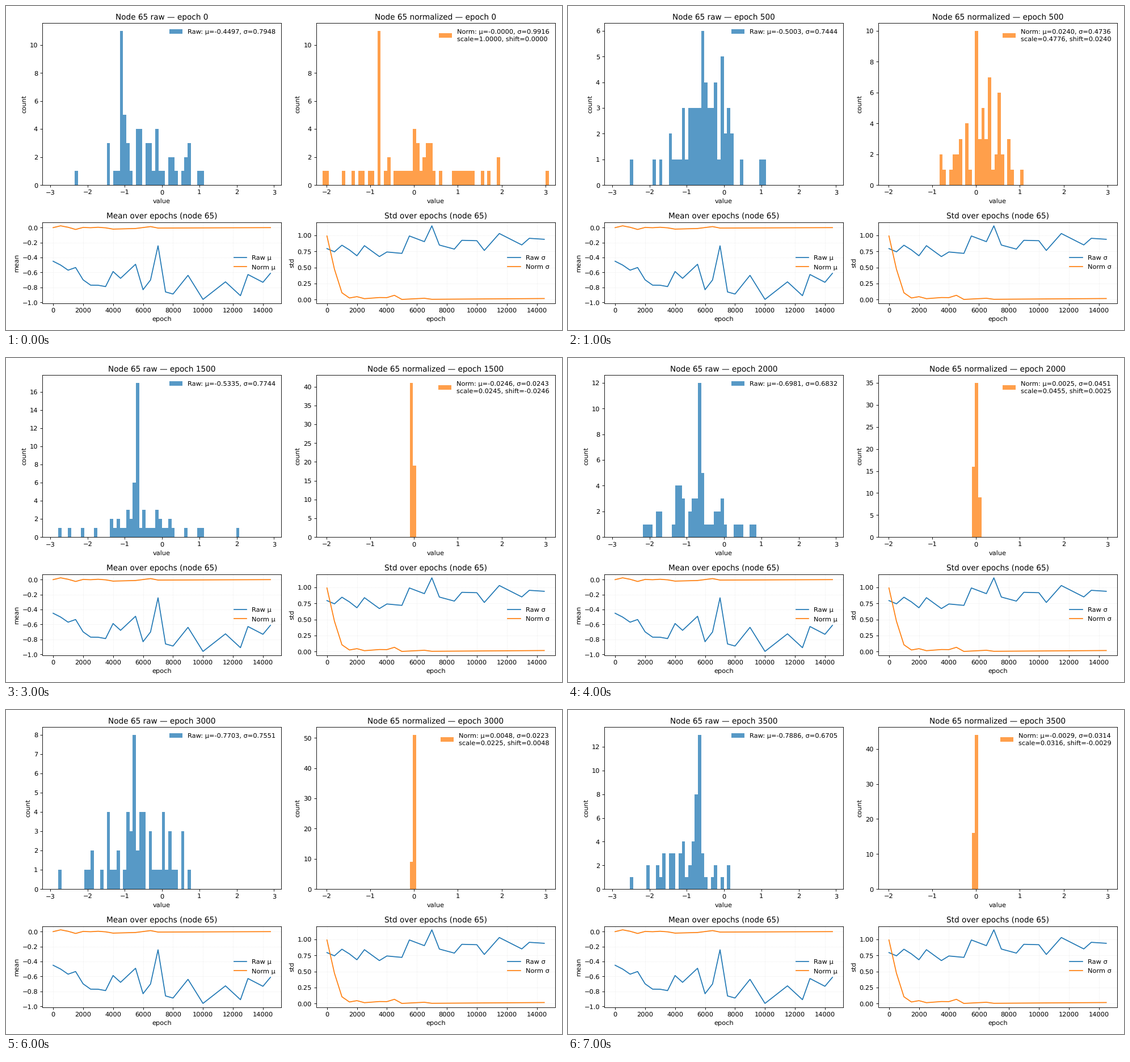
Animation, 980 px wide and 572 px high, one loop 8 s. Source, as a matplotlib script:

```python
import numpy as np
import matplotlib.pyplot as plt
from matplotlib.animation import FuncAnimation

plt.rcParams.update({"font.family": "DejaVu Sans", "font.size": 10.2,
                     "lines.linewidth": 1.53, "text.hinting": "none"})

WIDTH, HEIGHT, DPI = 980, 572, 80
NODE, STEP, SAMPLES, BINS = 65, 500, 60, 74
BLUE, ORANGE = "tab:blue", "tab:orange"
RAW_EDGES = np.linspace(-3.214, 3.197, BINS + 1)
NORM_EDGES = np.linspace(-2.235, 3.222, BINS + 1)

# One row per epoch: raw mean, raw std, raw mode and its count,
# then normalized mean, scale and highest count
EPOCHS = [
    (-.4497, .7948, -1.09, 11, -0.0, 1.0, 11),
    (-.5003, .7444, -.55, 6, .0240, .4776, 10),
    (-.5691, .8476, -.65, 8, .0047, .1063, 18),
    (-.5335, .7744, -.65, 17, -.0246, .0245, 41),
    (-.6981, .6832, -.65, 12, .0025, .0455, 35),
    (-.7690, .8405, -.74, 9, -.0014, -.01386, 57),
    (-.7703, .7551, -.74, 8, .0048, .0225, 51),
    (-.7886, .6705, -.65, 13, -.0029, .03163, 44),
]


def norm_std(scale):
    """Population std of values scaled by their sample std."""
    return abs(scale) * np.sqrt((SAMPLES - 1) / SAMPLES)


def bin_counts(seed, edges, mean, std, mode, peak):
    """Counts of a seeded normal spread around one crowded bin."""
    crowded = np.searchsorted(edges, mode) - 1
    values = np.random.default_rng(seed).normal(mean, std, 20 * SAMPLES)
    values = values[np.searchsorted(edges, values) - 1 != crowded]
    counts = np.histogram(values[:SAMPLES - peak], edges)[0]
    counts = np.minimum(counts, peak - 1)
    counts[crowded] = peak
    return counts


def trend(start, keys):
    """Known first values, then straight lines between key points."""
    later = np.arange(len(start), 30) * STEP
    return np.append(start, np.interp(later, list(keys), list(keys.values())))


def draw_hist(ax, edges, counts, color, title, label):
    ax.clear()
    centers = (edges[:-1] + edges[1:]) / 2
    ax.hist(centers, bins=edges, weights=counts, color=color, alpha=0.75,
            label=label)
    ax.set_xlim(edges[0], edges[-1])
    ax.set(title=title, xlabel="value", ylabel="count")
    ax.legend(loc="upper right", frameon=False)


def draw_trend(ax, raw, norm, name, symbol):
    epochs = np.arange(len(raw)) * STEP
    ax.plot(epochs, raw, color=BLUE, label=f"Raw {symbol}")
    ax.plot(epochs, norm, color=ORANGE, label=f"Norm {symbol}")
    ax.set(title=f"{name} over epochs (node {NODE})", xlabel="epoch",
           ylabel=name.lower())
    ax.grid(True, linestyle=":", alpha=0.3)
    ax.legend(loc="center right", frameon=False)


fig = plt.figure(figsize=(WIDTH / DPI, HEIGHT / DPI), dpi=DPI)
grid = fig.add_gridspec(2, 2, height_ratios=[2, 1],
                        left=63.9 / WIDTH, right=967.9 / WIDTH,
                        top=1 - 30.4 / HEIGHT, bottom=1 - 524.5 / HEIGHT,
                        wspace=0.1455, hspace=0.305)
(ax_raw, ax_norm), (ax_mean, ax_std) = grid.subplots()


def update(i):
    epoch = i * STEP
    mean, std, mode, peak, n_mean, scale, n_peak = EPOCHS[i]
    n_std = norm_std(scale)
    n_mode = n_mean + scale * (mode - mean) / std
    draw_hist(ax_raw, RAW_EDGES,
              bin_counts([i, 0], RAW_EDGES, mean, std, mode, peak),
              BLUE, f"Node {NODE} raw — epoch {epoch}",
              f"Raw: μ={mean:.4f}, σ={std:.4f}")
    draw_hist(ax_norm, NORM_EDGES,
              bin_counts([i, 1], NORM_EDGES, n_mean, n_std, n_mode, n_peak),
              ORANGE, f"Node {NODE} normalized — epoch {epoch}",
              f"Norm: μ={n_mean:.4f}, σ={n_std:.4f}\n"
              f"scale={scale:.4f}, shift={n_mean + 0.0:.4f}")
    return []


raw_means, raw_stds, _, _, norm_means, scales, _ = np.transpose(EPOCHS)
draw_trend(
    ax_mean,
    trend(raw_means, {4000: -.587, 4500: -.678, 5500: -.49, 6000: -.83,
                      6500: -.70, 7000: -.243, 7500: -.86, 8000: -.888,
                      9000: -.638, 10000: -.96, 11500: -.725, 12500: -.91,
                      13000: -.627, 14000: -.731, 14500: -.611}),
    trend(norm_means, {4000: -.02, 5500: -.012, 6500: .014, 7000: -.006,
                       14500: 0}),
    "Mean", "μ")
draw_trend(
    ax_std,
    trend(raw_stds, {4000: .742, 5000: .72, 5500: .992, 6500: .903,
                     7000: 1.15, 7500: .85, 8500: .787, 9000: .924,
                     10000: .918, 10500: .766, 11500: 1.03, 13000: .852,
                     13500: .955, 14500: .94}),
    trend(norm_std(scales), {4000: .03, 4500: .066, 5000: .002, 6500: .02,
                             7000: .004, 14500: .016}),
    "Std", "σ")

anim = FuncAnimation(fig, update, frames=len(EPOCHS), interval=1000,
                     init_func=lambda: update(0), repeat=True)
plt.show()
```
